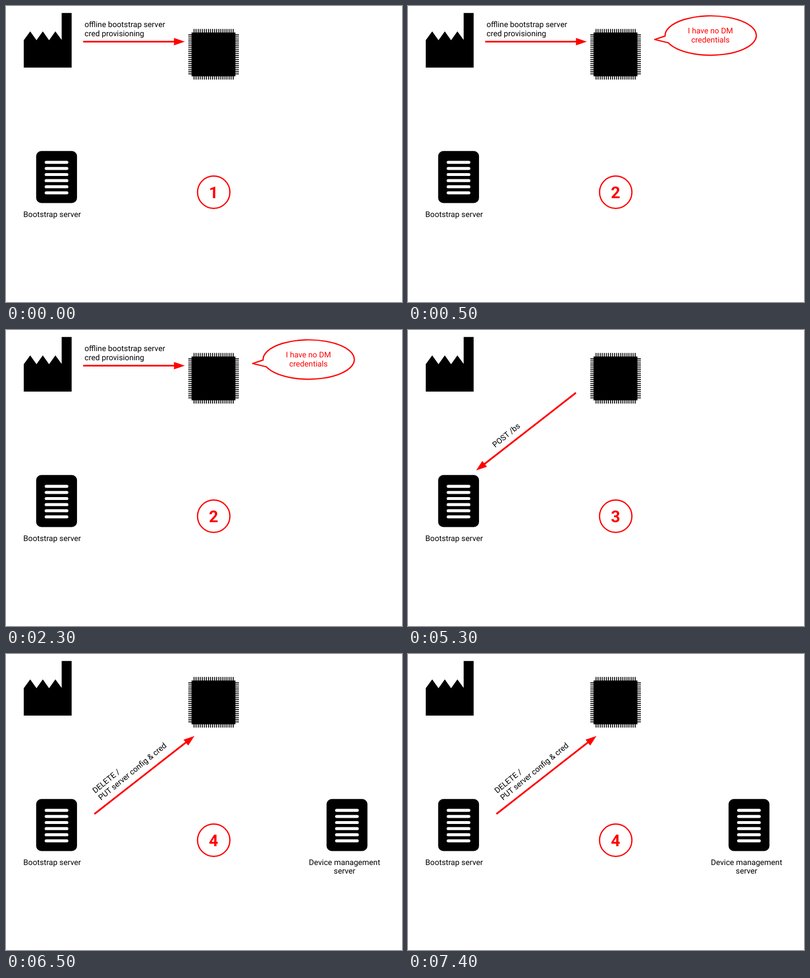
An HTML page that plays this animation: 692x519 px, repeating every 8 s.

```html
<!DOCTYPE html>
<html lang="en">
<head>
<meta charset="utf-8">
<title>Bootstrap sequence</title>
<style>
  html, body { margin: 0; width: 100%; height: 100%; overflow: hidden; background: #fff; }
  svg { display: block; width: 100vw; height: 100vh; }
  text { font: 13.7px Roboto, sans-serif; text-rendering: geometricPrecision; }
  .mid { text-anchor: middle; }
  .red { fill: #f00; }
  .line { fill: none; stroke: #f00; stroke-width: 2.2; }
  #count { font-size: 28.5px; font-weight: 700; }
  [data-steps] { visibility: hidden; }
</style>
</head>
<body>
<svg viewBox="0 0 692 519">
  <defs>
    <g id="server">
      <rect x="52.7" y="254.3" width="71.4" height="91.2" rx="9"/>
      <path d="M70.2 274.1h36.2m-36.2 10.7h36.2m-36.2 10.7h36.2m-36.2 10.7h36.2m-36.2 10.7h36.2m-36.2 10.7h36.2"
            stroke="#fff" stroke-width="5.2" stroke-linecap="round"/>
    </g>
    <g id="arrow">
      <path d="M0 0H162" stroke="#f00" stroke-width="3"/>
      <path class="red" d="M177.500 0l-19-6.600v13.200z"/>
    </g>
  </defs>

  <path d="M31 60l11.300-15.500L53.300 60l11-15.500L75.300 60l11-15.500L97.300 59.500V12.300h17.400V108H31z"/>
  <g id="chip"><rect x="324.300" y="46.500" width="76.600" height="76.800"/></g>
  <use href="#server"/>
  <text x="30.300" y="369.500">Bootstrap server</text>

  <circle class="line" cx="363" cy="326.500" r="28.300"/>
  <text id="count" class="red mid" x="362.600" y="337">1</text>

  <g data-steps="1 2">
    <text x="137.300" y="37">offline bootstrap server</text>
    <text x="137.300" y="53">cred provisioning</text>
    <use href="#arrow" transform="translate(135 62.500)"/>
  </g>

  <g data-steps="2">
    <path class="line" d="M450.300 57.300L431 58.800L454.800 64.300A79.800 34.400 0 1 0 449.600 51.800z" style="display:none"/>
    <path class="line" stroke-linejoin="round" d="M449.300 52.600L431 58.700L454.900 64.500A79.700 34.500 0 1 0 449.300 52.600z"/>
    <text class="red mid" x="528.500" y="48">I have no DM</text>
    <text class="red mid" x="528.500" y="64">credentials</text>
  </g>

  <g data-steps="3">
    <use href="#arrow" transform="translate(293.500 110) rotate(142) scale(1.244 1)" style="display:none"/>
    <path d="M293.500 110L131 237" stroke="#f00" stroke-width="3"/>
    <path class="red" d="M0 0l-19-6.600v13.200z" transform="translate(119 246.300) rotate(142)"/>
    <text transform="translate(152.300 206.500) rotate(-39.500)">POST /bs</text>
  </g>

  <g data-steps="4">
    <path d="M154.500 280.500L317 153" stroke="#f00" stroke-width="3"/>
    <path class="red" d="M0 0l-19-6.600v13.200z" transform="translate(329.300 143.700) rotate(-38)"/>
    <g transform="translate(156 244.700) rotate(-39.500)">
      <text>DELETE /</text>
      <text y="16">PUT server config &amp; cred</text>
    </g>
    <use href="#server" x="507.500"/>
    <text class="mid" x="591.600" y="369.500">Device management</text>
    <text class="mid" x="591.600" y="385.300">server</text>
  </g>
</svg>
<script>
  const LOOP = 8000;
  const STARTS = [0, 500, 3500, 6500];
  const count = document.getElementById('count');
  const parts = [...document.querySelectorAll('[data-steps]')];

  function drawPins() {
    let d = '';
    for (let i = 0; i < 20; i++) {
      const p = i * 3.6;
      d += `M${328.6 + p} 40.300v88.600M318.500 ${50.6 + p}h88.500`;
    }
    const pins = document.createElementNS('http://www.w3.org/2000/svg', 'path');
    pins.setAttribute('d', d);
    pins.setAttribute('stroke', '#000');
    pins.setAttribute('stroke-width', 1.6);
    document.getElementById('chip').append(pins);
  }

  let shown = 0;
  function show(step) {
    if (step === shown) return;
    shown = step;
    count.textContent = step;
    for (const part of parts) {
      const on = part.dataset.steps.split(' ').includes(String(step));
      part.style.visibility = on ? 'visible' : 'hidden';
    }
  }

  const origin = performance.now();
  function tick() {
    const t = (performance.now() - origin) % LOOP;
    show(STARTS.filter(s => s <= t).length);
    requestAnimationFrame(tick);
  }

  drawPins();
  tick();
</script>
</body>
</html>
```
